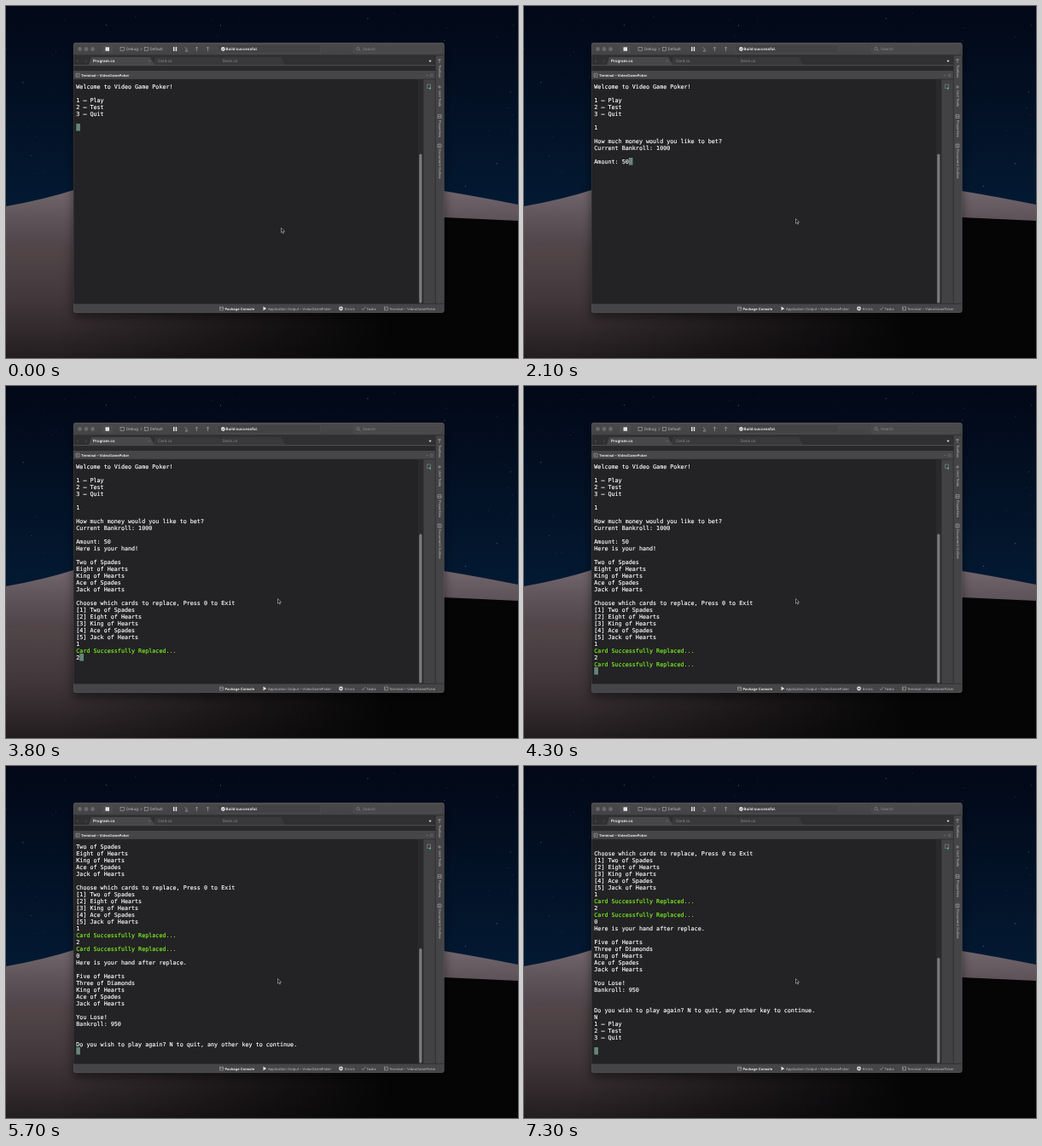
Write an HTML page that moves like this. It is 600x413 px and loops after 7400 ms.

```html
<!DOCTYPE html>
<html lang="en">
<head>
<meta charset="utf-8">
<title>Video Game Poker</title>
<style>
  html, body { margin: 0; width: 100%; height: 100%; overflow: hidden; background: #000; }
  svg { display: block; width: 100%; height: 100%; }
  text { white-space: pre; text-rendering: geometricPrecision; }
  .ui { font: 4.1px Inter, sans-serif; fill: #bdbdbe; }
  .ui .bold { font-weight: 700; fill: #e4e4e4; }
  .ui .dim { fill: #8e8e90; }
  .ui .large { font-size: 4.5px; }
  .ui .icon { fill: none; stroke: #a9a9aa; stroke-width: .6; }
  .ui .solid { fill: #e2e2e2; }
  #terminal { font: 6.735px "DejaVu Sans Mono", monospace; fill: #fff; }
  #rows { stroke: #fff; stroke-width: .14; }
  #terminal .success { fill: #7df524; stroke: #7df524; }
</style>
</head>
<body>
<svg viewBox="0 0 600 413" preserveAspectRatio="none">
  <defs>
    <linearGradient id="sky" x2="0" y2="1">
      <stop stop-color="#020817"/><stop offset="1" stop-color="#031a33"/>
    </linearGradient>
    <linearGradient id="ridge" gradientUnits="userSpaceOnUse" x1="0" y1="212" x2="0" y2="290">
      <stop stop-color="#75686f"/><stop offset=".5" stop-color="#5d5258"/><stop offset="1" stop-color="#4b4146"/>
    </linearGradient>
    <linearGradient id="slope" gradientUnits="userSpaceOnUse" x1="0" y1="278" x2="0" y2="413">
      <stop stop-color="#53474a"/><stop offset=".5" stop-color="#41373a"/><stop offset="1" stop-color="#231d1f"/>
    </linearGradient>
    <linearGradient id="shade">
      <stop offset=".1" stop-color="#050506" stop-opacity="0"/><stop offset=".75" stop-color="#050506"/>
    </linearGradient>
    <linearGradient id="bar" x2="0" y2="1">
      <stop stop-color="#4a4a4c"/><stop offset="1" stop-color="#434345"/>
    </linearGradient>
    <filter id="shadow" x="-10%" y="-10%" width="120%" height="125%">
      <feDropShadow dx="0" dy="5" stdDeviation="6" flood-opacity=".5"/>
    </filter>
    <clipPath id="frame"><rect x="79" y="43" width="434.5" height="317" rx="3"/></clipPath>
  </defs>

  <!-- Desktop -->
  <rect width="600" height="240" fill="url(#sky)"/>
  <g id="stars" fill="#8fa3ba"></g>
  <path d="M0 235Q45 227 79 216L300 170L513 217Q555 224 600 233V413H0Z" fill="url(#ridge)"/>
  <path d="M300 240L513 248L600 252V413H200Z" fill="#050506"/>
  <path d="M0 285Q35 276 79 283L300 350H600V413H0Z" fill="url(#slope)"/>
  <path d="M0 285Q35 276 79 283L300 350H600V413H0Z" fill="url(#shade)"/>

  <!-- Window -->
  <rect x="79" y="43" width="434.5" height="317" rx="3" fill="#444446" filter="url(#shadow)"/>
  <g clip-path="url(#frame)">
    <rect x="79" y="43" width="435" height="15" fill="url(#bar)"/>
    <rect x="79" y="58" width="424" height="12" fill="#303032"/>
    <path d="M172 69L175 60H250L253 69ZM249 69L252 60H322L327 69Z" fill="#39393b"/>
    <path d="M97 69L100 60H169L174 69Z" fill="#48484a"/>
    <rect x="79" y="69" width="424" height="1.2" fill="#4b4b4d"/>
    <rect x="79" y="70.2" width="424" height="5.8" fill="#29292b"/>
    <rect x="79" y="76" width="424" height="10" fill="#464648"/>
    <rect x="79" y="86" width="410" height="263" fill="#232224"/>
    <rect x="483" y="86" width="6" height="263" fill="#2a2a2c"/>
    <rect x="489" y="86" width="14" height="263" fill="#424244"/>
    <path d="M79 57.8H513M503.3 58V349M79 349.3H513M79 86H503M489 86V349" stroke="#2a2a2c" stroke-width=".7"/>
    <rect id="scrollbar" x="484.2" width="3.2" rx="1.6" fill="#7b7b7d"/>
  </g>
  <rect x="79.25" y="43.25" width="434" height="316.5" rx="3" fill="none" stroke="#777" stroke-opacity=".45" stroke-width=".5"/>

  <g class="ui" id="chrome">
    <g fill="#69696b"><circle cx="86.5" cy="50.5" r="2.4"/><circle cx="94" cy="50.5" r="2.4"/><circle cx="101.5" cy="50.5" r="2.4"/></g>
    <rect x="112" y="45.5" width="13" height="10" rx="1.5" fill="#4c4c4e"/>
    <rect class="solid" x="116.5" y="48.3" width="4.5" height="4.5"/>
    <rect class="icon" x="134" y="48.5" width="4.5" height="4"/>
    <path class="icon" d="M157.6 49l1.4 1.6l-1.4 1.6"/>
    <rect class="icon" x="162.5" y="48.5" width="4" height="4"/>
    <path class="solid" d="M196 48h1.5v5h-1.5zM198.7 48h1.5v5h-1.5z"/>
    <path class="icon" d="M209.5 48.5l3 2.5l-2.5 2h3.5M223.5 53v-5l-1.5 1.7m1.5-1.7l1.5 1.7M236.5 53v-5l-1.5 1.7m1.5-1.7l1.5 1.7"/>
    <rect x="248" y="45.5" width="120.5" height="10" rx="1.5" fill="#424244" stroke="#565658" stroke-width=".4"/>
    <circle class="solid" cx="254.4" cy="50.5" r="2.4"/>
    <path d="M253.2 50.5l.9 1l1.5-2" fill="none" stroke="#3d3d3f" stroke-width=".6"/>
    <rect x="407" y="46" width="103" height="9.3" rx="1.5" fill="#49494b" stroke="#58585a" stroke-width=".4"/>
    <path class="icon" opacity=".7" d="M413.8 51.2l1.5 1.6M410.7 50a1.7 1.7 0 1 0 3.4 0a1.7 1.7 0 1 0-3.4 0"/>
    <path class="icon" opacity=".4" d="M84.8 63l-1.5 1.7l1.5 1.7M93 63l1.5 1.7l-1.5 1.7M167 63.5l2 2m0-2l-2 2M492 81.5h3M497.5 80h2.5v2.5h-2.5z"/>
    <path class="solid" d="M495.3 63.8h3.4l-1.7 2.2z"/>
    <path class="icon" d="M82 79.2h4v4h-4zM83 80.4l.9.8l-.9.8"/>
    <path class="icon" opacity=".7" d="M493.5 92h4v4.5h-4z"/>
    <circle cx="497" cy="96.7" r="1.1" fill="#45b977"/>
    <path class="icon" d="M508 62v5M506 63h4M506 95h4M508 93v4M506 127.5h4v4h-4zM506 129.5h4M506 162h4v4h-4zM508 162v4"/>
    <path class="icon" d="M250.5 353h4v4h-4zM250.5 354.5h4M417 355l1.4 1.8l2.7-3.8M443.5 353h4v4h-4zM444.3 354.2l.9.8l-.9.8"/>
    <path class="solid" d="M301.5 352.5l3.8 2.4l-3.8 2.4z"/>
    <circle class="solid" cx="392.5" cy="355" r="2.4"/>
    <path d="M391.5 354l2 2m0-2l-2 2" stroke="#444446" stroke-width=".7"/>
  </g>

  <g id="terminal">
    <rect id="cursor" width="4.6" height="8.6" fill="#668777"/>
    <g id="rows"></g>
  </g>
  <path id="pointer" d="M0 0V5.6L1.3 4.4L2.2 6.5L3.1 6.1L2.2 4.1H4Z" fill="#111" stroke="#ddd" stroke-width=".5"/>
</svg>

<script>
const LOOP = 7400, VISIBLE_ROWS = 31, LINE_HEIGHT = 8, CHAR_WIDTH = 4.055, LEFT = 82.3, TOP = 90;
const byId = id => document.getElementById(id);

function addText(parent, content, x, y, className = "") {
  const node = document.createElementNS("http://www.w3.org/2000/svg", "text");
  node.textContent = content;
  node.setAttribute("class", className);
  node.setAttribute("x", x);
  node.setAttribute("y", y);
  return parent.appendChild(node);
}

function drawStars() {
  let seed = 17;
  const random = () => (seed = seed * 16807 % 2147483647) / 2147483647;
  for (let i = 0; i < 170; i++) {
    const star = document.createElementNS("http://www.w3.org/2000/svg", "circle");
    star.setAttribute("cx", random() * 600);
    star.setAttribute("cy", random() * 212);
    star.setAttribute("r", .25 + random() ** 3 * .4);
    star.setAttribute("opacity", .15 + random() * .55);
    byId("stars").append(star);
  }
}

function drawLabels() {
  const chrome = byId("chrome");
  [
    ["Debug", 141, 52.2, "large"], ["Default", 168.5, 52.2, "large"],
    ["Build successful.", 257.5, 52.2, "large bold"], ["Search", 418, 52.2, "large dim"],
    ["Program.cs", 102, 66.2, "large bold"], ["Card.cs", 178, 66.2, "large dim"], ["Deck.cs", 254, 66.2, "large dim"],
    ["Terminal – VideoGamePoker", 88, 82.8, "bold"],
    ["Package Console", 256.5, 356.5, "bold"], ["Application Output – VideoGamePoker", 307, 356.5],
    ["Errors", 397, 356.5], ["Tasks", 422.5, 356.5], ["Terminal – VideoGamePoker", 449, 356.5]
  ].forEach(label => addText(chrome, ...label));
  [["Toolbox", 69], ["Unit Tests", 99], ["Properties", 134], ["Document Outline", 168]].forEach(([label, y]) =>
    addText(chrome, label, 0, 0).setAttribute("transform", `translate(506.6 ${y}) rotate(90)`));
}

const menu = "1 – Play\n2 – Test\n3 – Quit\n\n";
const kept = ["King of Hearts", "Ace of Spades", "Jack of Hearts"];
const dealt = ["Two of Spades", "Eight of Hearts", ...kept];
const redrawn = ["Five of Hearts", "Three of Diamonds", ...kept];
const lines = list => list.join("\n") + "\n";
const replaced = "Card Successfully Replaced...";

// Each entry: time in ms, text appended to the terminal.
const output = [
  [0, "Welcome to Video Game Poker!\n\n" + menu],
  [900, "1"],
  [1000, "\n"],
  [1100, "\nHow much money would you like to bet?\nCurrent Bankroll: 1000\n"],
  [1200, "\nAmount: "],
  [2000, "5"],
  [2100, "0"],
  [2300, "\nHere is your hand!\n\n" + lines(dealt) + "\nChoose which cards to replace, Press 0 to Exit\n" +
    lines(dealt.map((card, i) => `[${i + 1}] ${card}`))],
  [3300, "1"],
  [3400, "\n"],
  [3500, replaced],
  [3600, "\n"],
  [3800, "2"],
  [4000, "\n"],
  [4100, replaced],
  [4200, "\n"],
  [4900, "0"],
  [5400, "\nHere is your hand after replace.\n\n" + lines(redrawn) + "\nYou Lose!\nBankroll: 950\n\n\n" +
    "Do you wish to play again? N to quit, any other key to continue.\n"],
  [6900, "N"],
  [7300, "\n" + menu]
];
const scrollbarTops = [[0, 173.5], [5300, 202], [5400, 214], [7200, 225]];

function drawTerminal(time) {
  const transcript = output.filter(([start]) => start <= time).map(([, text]) => text).join("");
  const rows = transcript.split("\n").slice(-VISIBLE_ROWS);
  const last = rows.length - 1;
  byId("rows").replaceChildren();
  rows.forEach((row, i) =>
    addText(byId("rows"), row, LEFT, TOP + 6.9 + i * LINE_HEIGHT, row === replaced ? "success" : ""));
  byId("cursor").setAttribute("x", LEFT + rows[last].length * CHAR_WIDTH);
  byId("cursor").setAttribute("y", TOP + last * LINE_HEIGHT);
}

function render(time) {
  drawTerminal(time);
  const top = scrollbarTops.filter(([start]) => start <= time).pop()[1];
  byId("scrollbar").setAttribute("y", top);
  byId("scrollbar").setAttribute("height", 348.5 - top);
  byId("pointer").setAttribute("transform", time < 100 ? "translate(322.5 260.3)" : "translate(318.5 249.6)");
}

let shownTick = -1;
function tick() {
  const time = Math.floor(performance.now() % LOOP / 100) * 100;
  if (time !== shownTick) render(shownTick = time);
  requestAnimationFrame(tick);
}

drawStars();
drawLabels();
tick();
</script>
</body>
</html>
```
